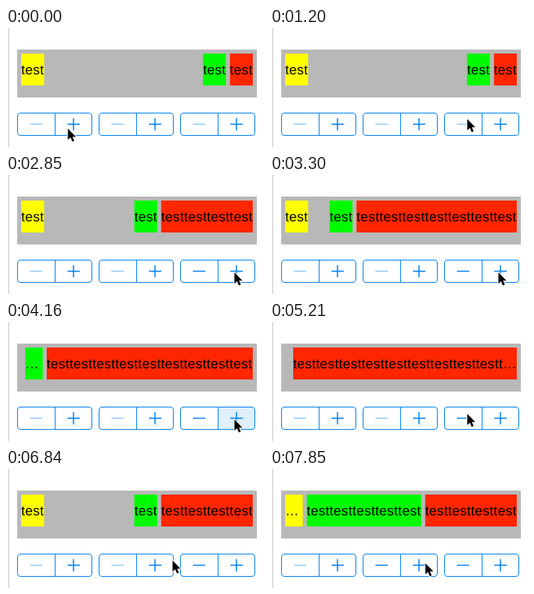
An HTML page with a canvas that plays this animation: 323 px wide and 149 px high, repeating every 7990 ms.

```html
<!DOCTYPE html>
<html lang="en">
<head>
<meta charset="utf-8">
<title>Label priorities</title>
<style>
  html, body { margin: 0; width: 100%; height: 100%; overflow: hidden; background: #fff; }
  canvas { display: block; width: 323px; height: 149px; }
</style>
</head>
<body>
<canvas id="stage"></canvas>
<script>
const W = 323, H = 149, LOOP = 7990;
const BLUE = '#0b86ee', PALE = '#93c8f4', PRESSED = '#dfeffb';
const UNIT = 28.67, GAP = 5, LEFT = 19, ROOM = 280;

const canvas = document.getElementById('stage');
const ctx = canvas.getContext('2d');
const dpr = window.devicePixelRatio || 1;
canvas.width = W * dpr;
canvas.height = H * dpr;
ctx.scale(dpr, dpr);

// Times at which a stepper value goes up or down
const redUp = [2550, 2700, 2850, 3000, 3150, 3300, 3450, 3740, 4310];
const redDown = [5650, 5800, 5950, 6100, 6390, 6540];
const greenUp = [7420, 7560, 7710, 7850];

// Pressed button halves: start, end, stepper, side
const presses = [
  [2400, 2550, 2, 1], [3600, 3740, 2, 1], [4160, 4310, 2, 1], [4460, 4610, 2, 1],
  [5500, 5650, 2, 0], [6240, 6390, 2, 0], [7270, 7420, 1, 1]
];

// Pointer moves: start, number of steps, goal x, goal y
const START = [77.5, 126];
const STEP = 149;
const moves = [
  [300, 6, 255, 114], [1200, 1, 247, 114], [1350, 7, 286, 122],
  [4910, 3, 247, 115], [6840, 1, 208.5, 114.5], [6980, 2, 194.5, 118]
];

const past = (times, t) => times.filter(s => s <= t).length;

function pointerAt(t) {
  let [x, y] = START;
  for (const [at, n, gx, gy] of moves) {
    if (t < at) break;
    const k = Math.min(1, (Math.floor((t - at) / STEP) + 1) / n);
    const e = k * (2 - k);
    x += (gx - x) * e;
    y += (gy - y) * e;
  }
  return [x, y];
}

function fit(text, width) {
  if (ctx.measureText(text).width <= width + 0.1) return text;
  let n = text.length;
  while (n > 0 && ctx.measureText(text.slice(0, n) + '…').width > width) n--;
  return text.slice(0, n) + '…';
}

function label(x, width, count, color) {
  if (width <= 0) return;
  ctx.fillStyle = color;
  ctx.fillRect(x, 32, width, 40);
  ctx.fillStyle = '#000';
  ctx.fillText(fit('test'.repeat(count), width), x, 58);
}

function labels(green, red) {
  const r = Math.min(red * UNIT, ROOM);
  const g = Math.min(green * UNIT, ROOM - r);
  const y = Math.min(UNIT, ROOM - r - g);
  const redX = LEFT + ROOM + 2 * GAP - r;
  label(LEFT, y, 1, '#ffff00');
  label(redX - GAP - g, g, green, '#00fb00');
  label(redX, r, red, '#ff2600');
}

function line(x1, y1, x2, y2, color, width) {
  ctx.strokeStyle = color;
  ctx.lineWidth = width;
  ctx.beginPath();
  ctx.moveTo(x1, y1);
  ctx.lineTo(x2, y2);
  ctx.stroke();
}

function stepper(x, canDrop, side) {
  ctx.beginPath();
  ctx.roundRect(x + 0.5, 106.5, 93, 28, 3.5);
  if (side !== undefined) {
    ctx.save();
    ctx.clip();
    ctx.fillStyle = PRESSED;
    ctx.fillRect(x + side * 47, 106, 47, 29);
    ctx.restore();
  }
  ctx.strokeStyle = BLUE;
  ctx.lineWidth = 1;
  ctx.stroke();
  line(x + 47.5, 107, x + 47.5, 134, BLUE, 1);
  line(x + 16, 120.5, x + 31.5, 120.5, canDrop ? BLUE : PALE, 1.5);
  line(x + 63, 120.5, x + 78.5, 120.5, BLUE, 1.6);
  line(x + 70.5, 112.8, x + 70.5, 128.2, BLUE, 1.6);
}

const arrow = new Path2D('M0 0V14L3.2 11L5.5 16.3L8 15.2L5.7 10.2H10Z');

function pointer(x, y) {
  ctx.save();
  ctx.translate(x, y);
  ctx.lineJoin = 'round';
  ctx.strokeStyle = '#fff';
  ctx.lineWidth = 1.8;
  ctx.stroke(arrow);
  ctx.fillStyle = '#000';
  ctx.fill(arrow);
  ctx.restore();
}

function draw(t) {
  const red = 1 + past(redUp, t) - past(redDown, t);
  const green = 1 + past(greenUp, t);
  const press = presses.find(p => t >= p[0] && t < p[1]);

  ctx.fillStyle = '#fff';
  ctx.fillRect(0, 0, W, H);
  ctx.fillStyle = '#c9c9c9';
  ctx.fillRect(3, 0, 1, H);
  ctx.fillStyle = '#b8b8b8';
  ctx.fillRect(14, 27, 300, 60);

  ctx.font = '17px "Liberation Sans", Arial, sans-serif';
  ctx.letterSpacing = '0.3px';
  ctx.textRendering = 'geometricPrecision';
  labels(green, red);

  [1, green, red].forEach((count, i) => {
    stepper(14 + i * 102, count > 1, press && press[2] === i ? press[3] : undefined);
  });
  pointer(...pointerAt(t));
}

const begin = performance.now();
function tick() {
  draw((performance.now() - begin) % LOOP);
  requestAnimationFrame(tick);
}
tick();
</script>
</body>
</html>
```
